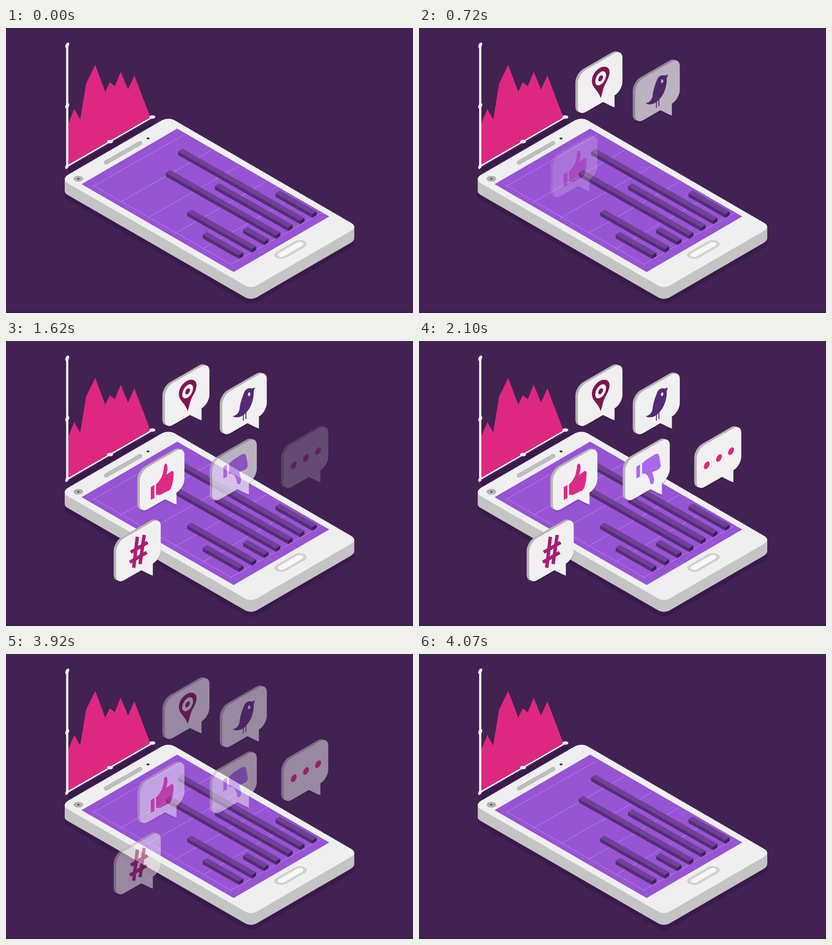
Recreate the animation shown at these times as an HTML page. Size 894 px wide and 626 px high, loop 4270 ms.

```html
<!DOCTYPE html>
<html lang="en">
<head>
<meta charset="utf-8">
<title>Phone analytics</title>
<style>
html, body { margin: 0; width: 100%; height: 100%; overflow: hidden; background: #412253; }
svg { display: block; width: 100%; height: 100%; }
.b { opacity: 0; animation: 4270ms steps(20) infinite; }

/* Bubbles fade in over 600 ms, 300 ms apart, and leave together. */
#pin  { animation-name: in0; }
#bird { animation-name: in1; }
#up   { animation-name: in2; }
#hash { animation-name: in3; }
#down { animation-name: in4; }
#dots { animation-name: in5; }
@keyframes in0 {
  0% { opacity: 0; animation-timing-function: step-end; }
  1.4052% { opacity: .1; animation-timing-function: steps(18); }
  14.0515%, 88.2904% { opacity: 1; animation-timing-function: steps(10); }
  95.3162%, 100% { opacity: 0; }
}
@keyframes in1 {
  0%, 7.0258% { opacity: 0; }
  21.0773%, 88.2904% { opacity: 1; animation-timing-function: steps(10); }
  95.3162%, 100% { opacity: 0; }
}
@keyframes in2 {
  0%, 14.0515% { opacity: 0; }
  28.103%, 88.2904% { opacity: 1; animation-timing-function: steps(10); }
  95.3162%, 100% { opacity: 0; }
}
@keyframes in3 {
  0%, 21.0773% { opacity: 0; }
  35.1288%, 88.2904% { opacity: 1; animation-timing-function: steps(10); }
  95.3162%, 100% { opacity: 0; }
}
@keyframes in4 {
  0%, 28.103% { opacity: 0; }
  42.1546%, 88.2904% { opacity: 1; animation-timing-function: steps(10); }
  95.3162%, 100% { opacity: 0; }
}
@keyframes in5 {
  0%, 35.1288% { opacity: 0; }
  49.1803%, 88.2904% { opacity: 1; animation-timing-function: steps(10); }
  95.3162%, 100% { opacity: 0; }
}
</style>
</head>
<body>
<svg viewBox="0 0 894 626" preserveAspectRatio="none">
  <defs>
    <!-- upright isometric plane: matrix(.866 -.5 0 1) -->
    <path id="face" transform="matrix(.866 -.5 0 1 6 50)" d="M0 20A20 20 0 0 1 20 0H93A20 20 0 0 1 113 20V72.5A20 20 0 0 1 93 92.5V119L64.5 92.5H20A20 20 0 0 1 0 72.5Z"/>
    <g id="bubble">
      <use href="#face" x="0" y="4" fill="#1c0430" opacity=".13"/>
      <g fill="#b8b2b6">
        <use href="#face" x="-5.5" y="-2"/>
        <use href="#face" x="-2.7" y="-1"/>
      </g>
      <use href="#face" fill="#f0f0f0"/>
    </g>
    <path id="body" d="M129 333V359Q129 363 136 367L526 592Q538 598 550 592L757 472Q765 467 765 462V436Z"/>
    <circle id="disc" r="1" transform="matrix(.866 -.5 0 1 0 0)"/>
  </defs>

  <rect width="894" height="626" fill="#412253"/>
  <rect y="622" width="894" height="4" fill="#3b1d4e"/>

  <!-- shadows -->
  <use href="#body" y="11" fill="#381a4b"/>
  <path d="M137 314L326 205" stroke="#391a4b" stroke-width="10" fill="none"/>

  <!-- phone -->
  <use href="#body" fill="#c4c4c4"/>
  <path fill="#efefef" d="M129 332Q129 327 136 322.5L343 202.5Q357 196 370 202.5L758 428Q765 432 765 437Q764 442 757 446L550 566Q538 572 526 566L136 341Q129 337 129 332Z"/>
  <path fill="#9754d3" d="M376 221L710 414L500 536L166 343Z"/>
  <path id="grid" fill="none" stroke="#ab6ce8" stroke-width="2"/>
  <g id="bars"></g>

  <path d="M219.5 295.5L295 252.5" stroke="#b2b2b2" stroke-width="9" stroke-linecap="round"/>
  <path d="M219.5 295.5L295 252.5" stroke="#bebebe" stroke-width="7" stroke-linecap="round"/>
  <ellipse cx="159" cy="331" rx="10.5" ry="6.3" fill="#b0b0b0"/>
  <ellipse cx="159" cy="331" rx="2.3" ry="1.5" fill="#383838"/>
  <ellipse cx="312" cy="242.5" rx="3.3" ry="2" fill="#383838"/>
  <g transform="matrix(.866 -.5 .866 .5 625 486.5)">
    <rect x="-35" y="-11.5" width="70" height="23" rx="11.5" fill="#d8d8d8" stroke="#b6b6b6"/>
    <rect x="-31" y="-7.5" width="62" height="15" rx="7.5" fill="#f7f7f7" stroke="#b8b8b8"/>
  </g>

  <!-- chart -->
  <path fill="#de2880" d="M136 212L150 178L163 201L176 122L196 81L218 140L228 119L239 128L252 96L268 135L282 104L317 196L136 301Z"/>
  <g fill="#f2f0f3" stroke="#f2f0f3">
    <path d="M134.5 38V304" stroke-width="5" fill="none"/>
    <path d="M134 304L322 195.5" stroke-width="3.2" fill="none"/>
    <g stroke="none">
      <ellipse rx="3.8" ry="6.5" transform="translate(134.5 38) rotate(25)"/>
      <ellipse rx="3.8" ry="6.5" transform="translate(134.5 171) rotate(25)"/>
      <ellipse rx="3.4" ry="6" transform="translate(134 304) rotate(25)"/>
      <ellipse cx="228.5" cy="249.5" rx="6.5" ry="3.8"/>
      <ellipse cx="321.5" cy="195.5" rx="6.5" ry="3.8"/>
    </g>
  </g>

  <!-- bubbles -->
  <g class="b" id="pin">
    <use href="#bubble" x="343" y="52"/>
    <path fill="#7c1750" d="M399 154C396 144 391 139 385 131C379 124 379 114 381 108C385 96 396 85 407 85C417 85 420 93 418 102C416 113 409 121 406 130C403 138 402 147 399 154Z"/>
    <use href="#disc" transform="translate(399 110.5) scale(13.8)" fill="#f0f0f0"/>
    <use href="#disc" transform="translate(399 110.5) scale(6)" fill="#7c1750"/>
  </g>
  <g class="b" id="bird">
    <use href="#bubble" x="469" y="70"/>
    <path fill="#552a72" d="M498 165C506 164 511 158 513 150C514 138 518 126 522 116C525 107 531 102 540 104.5L547 102L544 110C545 122 541 138 534 149C527 159 518 167.5 509 167.5C504 168 500 167 498 165Z"/>
    <path stroke="#552a72" stroke-width="2" d="M521.5 160V175M527 156V171.5"/>
    <ellipse rx="2.5" ry="4" transform="translate(534 117) rotate(15)" fill="#f0f0f0"/>
  </g>
  <g class="b" id="up">
    <use href="#bubble" x="288" y="237"/>
    <path fill="#dc2a85" d="M318 321L326 316V345L318 349ZM329.5 315C334 311 339 305 342 298C345 291 346 284 347 276C348 268 353 267 354 273C356 279 354 287 352 294L363 286C367 284 369 288 368 293C368 305 365 318 362 324C360 328 356 330 352 331L339 338C336 339 332 337 329.5 339Z"/>
  </g>
  <g class="b" id="hash">
    <use href="#bubble" x="236" y="393"/>
    <path fill="none" stroke="#a81e72" stroke-width="7.5" d="M288.5 430L280.5 498M303.5 426L294.5 490M274 464L311 442.5M272 486L309 464.5"/>
  </g>
  <g class="b" id="down">
    <use href="#bubble" x="447" y="215"/>
    <path fill="#a96aea" d="M477.5 276L485.500 271V297.500L477.500 302ZM490 269C494 266 497 262 502 259L518 249C524 246 527 248 528 255L531 272C531 278 528 281 524 283L512 288C514 295 517 301 516 308C515 315 510 317 508 312C506 304 505 298 499 293C496 291 493 291 490 292Z"/>
  </g>
  <g class="b" id="dots">
    <use href="#bubble" x="604" y="188"/>
    <g fill="#de2880">
      <use href="#disc" transform="translate(632 273) scale(7.5)"/>
      <use href="#disc" transform="translate(659 257) scale(7.5)"/>
      <use href="#disc" transform="translate(685.5 242) scale(7.5)"/>
    </g>
  </g>
</svg>
<script>
const SLOPE = 0.567;

// Six cross lines and the long base line of the screen grid
let grid = 'M192 346L498 521';
for (let i = 0; i < 6; i++) {
  grid += `M${190 + i * 60.4} ${348.5 + i * 34.3}l200 -113.5`;
}
document.getElementById('grid').setAttribute('d', grid);

// Left corner of each bar and its length along x
const bars = [
  [592, 363, 81], [378, 271, 268], [459, 347, 161], [351, 318, 242],
  [521, 443, 46], [398, 405, 142], [432, 454, 80]
];
document.getElementById('bars').innerHTML = bars.map(([x, y, len]) => {
  const run = `l${len} ${len * SLOPE}`;
  const back = `l${-len} ${-len * SLOPE}`;
  return `<path fill="#6f4197" d="M${x} ${y}l9.5 -6${run}l-9.5 6Z"/>` +
    `<path fill="#552d76" d="M${x} ${y}${run}v8${back}Z"/>` +
    `<path fill="#3f2058" d="M${x + len} ${y + len * SLOPE}l9.5 -6v8l-9.5 6Z"/>`;
}).join('');
</script>
</body>
</html>
```
